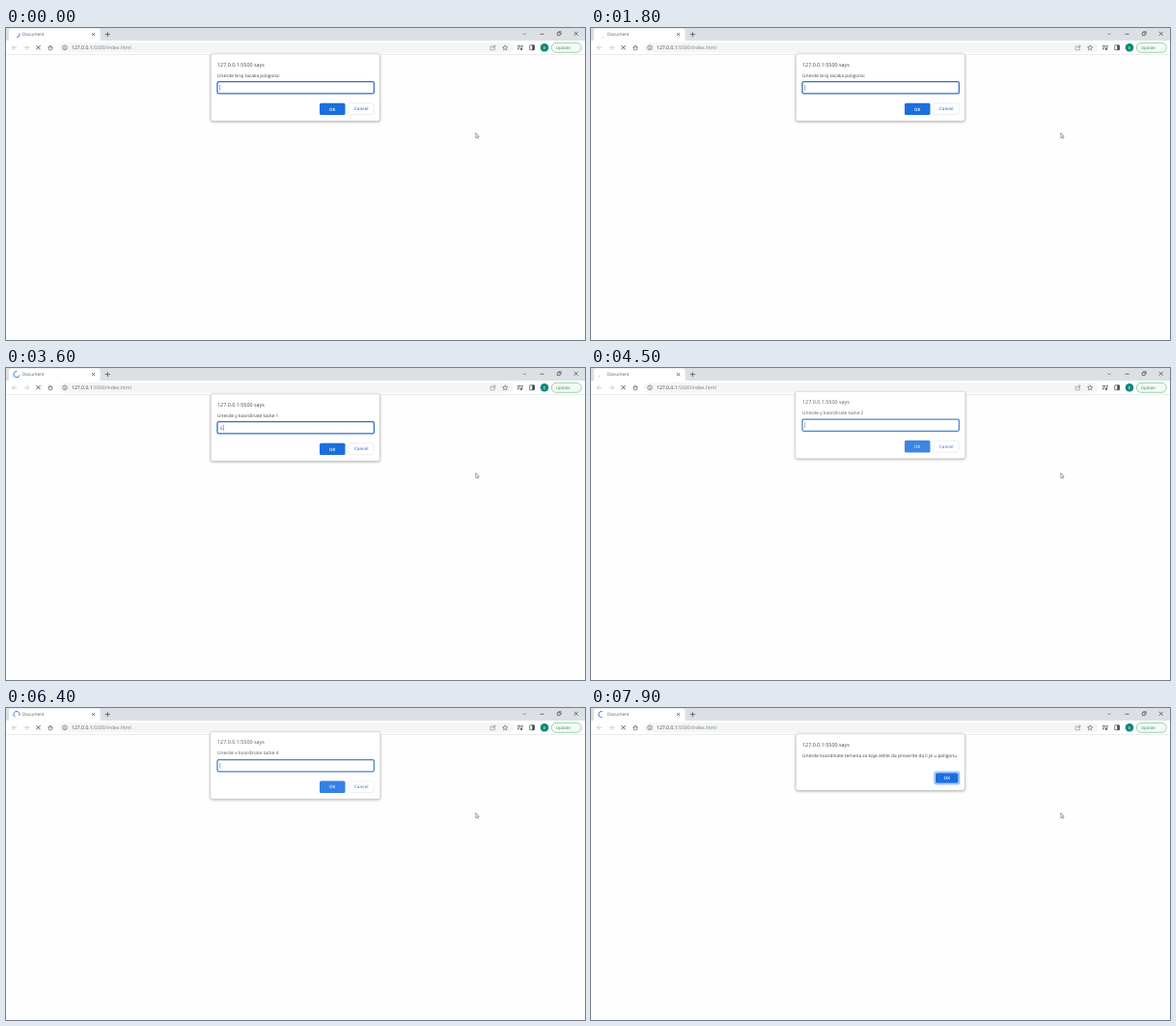
Write an HTML page with a canvas that moves like this. It is 600 px wide and 323 px high and loops after 8 s.

```html
<!DOCTYPE html>
<html lang="sr">
<head>
<meta charset="utf-8">
<title>Document</title>
<style>
html, body { margin: 0; width: 100%; height: 100%; overflow: hidden; background: #fff; }
canvas { display: block; width: 600px; height: 323px; }
</style>
</head>
<body>
<canvas id="stage" width="600" height="323"></canvas>
<script>
const ctx = document.getElementById('stage').getContext('2d');
const LOOP = 8000, STEP = 100;
const FIRST = 2525, GAP = 630;            // first coordinate prompt, time per prompt
const FADE_IN = 190, FADE_OUT = 50;
const FONT = '"Open Sans", "Noto Sans", sans-serif';
const INK = '#3f4347', GREY = '#606468', BLUE = '#1a6fdf', GREEN = '#3d8f59';
const TURN = Math.PI * 2;

const clamp = v => Math.max(0, Math.min(1, v));

function text(str, x, y, size, color = INK, weight = 400, align = 'left') {
  ctx.font = `${weight} ${size}px ${FONT}`;
  ctx.textAlign = align;
  ctx.fillStyle = color;
  ctx.fillText(str, x, y);
  return ctx.measureText(str).width;
}

function paint(fill, stroke, width) {
  if (fill) { ctx.fillStyle = fill; ctx.fill(); }
  if (stroke) { ctx.strokeStyle = stroke; ctx.lineWidth = width; ctx.stroke(); }
}

function box(x, y, w, h, r, fill, stroke, width = 0.7) {
  ctx.beginPath();
  ctx.roundRect(x, y, w, h, r);
  paint(fill, stroke, width);
}

function disc(x, y, r, fill, stroke, width = 0.7) {
  ctx.beginPath();
  ctx.arc(x, y, r, 0, TURN);
  paint(fill, stroke, width);
}

function line(x1, y1, x2, y2, color = INK, width = 0.7) {
  ctx.beginPath();
  ctx.moveTo(x1, y1);
  ctx.lineTo(x2, y2);
  paint(null, color, width);
}

function cross(x, y, r, color = INK, width = 0.75) {
  line(x - r, y - r, x + r, y + r, color, width);
  line(x - r, y + r, x + r, y - r, color, width);
}

// Right-angled tip at (x, y), pointing along the given part of a turn
function chevron(x, y, r, dir, color = INK, width = 0.7) {
  ctx.beginPath();
  for (const [along, side] of [[-r, -r], [0, 0], [-r, r]]) {
    const a = dir * TURN;
    ctx.lineTo(x + along * Math.cos(a) - side * Math.sin(a), y + along * Math.sin(a) + side * Math.cos(a));
  }
  paint(null, color, width);
}

function arrow(x, dir, color) {
  line(x - 2.4 * dir, 20.3, x + 2.4 * dir, 20.3, color);
  chevron(x + 2.4 * dir, 20.3, 2.4, dir > 0 ? 0 : 0.5, color);
}

function star(x, y, r) {
  ctx.beginPath();
  for (let i = 0; i < 10; i++) {
    const a = (i / 10 - 0.25) * TURN, len = i % 2 ? r * 0.46 : r;
    ctx.lineTo(x + len * Math.cos(a), y + len * Math.sin(a));
  }
  ctx.closePath();
  paint(null, GREY, 0.65);
}

// Cubic bezier (.4, 0, .2, 1)
function ease(x) {
  let lo = 0, hi = 1, u = 0.5;
  for (let i = 0; i < 20; i++) {
    u = (lo + hi) / 2;
    const bx = 1.2 * u * (1 - u) ** 2 + 0.6 * u * u * (1 - u) + u ** 3;
    if (bx < x) lo = u; else hi = u;
  }
  return 3 * u * u * (1 - u) + u ** 3;
}

// Alternately shrinking and growing arc on a steady rotation
function spinner(t) {
  const arcTime = 666, maxArc = 0.75, minArc = 0.033, age = t + 258;
  const half = Math.floor(age / arcTime);
  const part = ease(age % arcTime / arcTime) * maxArc;
  const growing = half % 2 === 1;
  const sweep = growing ? Math.max(part, minArc) : Math.min(part - maxArc, -minArc);
  const start = 0.722 + (t - 3100) / 1568 + (Math.floor(half / 2) - 2) * maxArc;
  ctx.beginPath();
  ctx.arc(11, 6.6, 3.1, start * TURN, (start + sweep) * TURN, !growing);
  paint(null, '#3f7fdc', 1);
}

function tabStrip() {
  ctx.fillStyle = '#dce0e4';
  ctx.fillRect(0, 0, 600, 13);
  box(3, 0.5, 94.5, 16, 2.5, '#fff');
  text('Document', 17, 8.3, 4.6, '#54585c');
  cross(90.5, 6.6, 1.5);
  line(102.7, 6.6, 107.9, 6.6);
  line(105.3, 4, 105.3, 9.2);
  chevron(537.2, 7, 1.5, 0.25, GREY);
  line(553.3, 6.3, 557.5, 6.3);
  box(571.2, 4.6, 3, 3, 0.4, null, INK);
  chevron(575.2, 3.7, 2.1, -0.125, INK, 0.6);
  cross(590.7, 5.8, 2);
}

function addressBar() {
  box(55, 15.2, 470.5, 10.3, 5.15, '#f4f5f6');
  disc(61, 20.3, 2.3, null, GREY);
  line(61, 18.9, 61, 19.5, GREY);
  line(61, 20, 61, 21.7, GREY);
  const w = text('127.0.0.1', 68, 22.1, 5.11, INK);
  text(':5500/index.html', 68 + w, 22.1, 5.11, '#74787c');
  box(502, 19, 4.4, 3.8, 0.3, null, '#85898d', 0.6);
  line(504, 21, 506.8, 18.6, '#85898d', 0.6);
  chevron(507.2, 18.6, 1.5, 0, '#85898d', 0.6);
  star(517.2, 20.5, 2.8);
}

function toolbar() {
  ctx.fillStyle = '#fff';
  ctx.fillRect(0, 13, 600, 14);
  ctx.fillStyle = '#e2e4e6';
  ctx.fillRect(0, 27, 600, 0.7);
  arrow(8.7, -1, '#b8bbbe');
  arrow(21.2, 1, '#b8bbbe');
  cross(33.5, 20.2, 2.1, INK, 0.85);
  chevron(46, 17.8, 2.6, -0.25, GREY);
  box(44.3, 19.7, 3.4, 3, 0.2, null, GREY);
  addressBar();

  for (let i = 0; i < 3; i++) {
    const y = 18.4 + i * 1.7;
    line(529.8, y, i < 2 ? 533.6 : 532, y);
    disc(591.3, 18.2 + i * 2.1, 0.62, GREEN);
  }
  line(534.8, 18.2, 534.8, 22);
  line(534.8, 18.4, 536, 18.4);
  disc(533.9, 22, 0.95, INK);
  box(542.7, 17.8, 4.9, 4.9, 0.5, null, INK);
  box(545.3, 17.8, 2.3, 4.9, 0, INK);

  disc(558, 20.3, 4.3, '#10897b');
  text('E', 558, 21.8, 4.2, '#fff', 400, 'center');
  box(565.3, 15.4, 31, 9.9, 4.95, '#f3faf5', '#75bd8b');
  text('Update', 569.8, 21.9, 4.4, GREEN);
}

// The prompts follow one another at an even pace: x and y of each corner, then a notice
function dialogAt(t) {
  const n = Math.floor((t - FIRST) / GAP);
  if (n < 0) {
    return { msg: 'Unesite broj tacaka poligona:', value: '4', open: -1000, key: 2250, close: FIRST };
  }
  const open = FIRST + n * GAP;
  if (n >= 8) {
    return { msg: 'Unesite koordinate temena za koje zelite da proverite da li je u poligonu',
      alert: true, open, close: Infinity };
  }
  const axis = n % 2 ? 'y' : 'x', corner = Math.floor(n / 2) + 1;
  return { msg: `Unesite ${axis} koordinate tacke ${corner}`, value: axis === 'x' ? '3' : '6',
    open, key: open + 0.7 * GAP, close: open + GAP };
}

function button(label, x, y, w, h, primary) {
  box(x, y, w, h, 1.5, primary ? BLUE : '#fff', primary ? null : '#e2e5e9');
  text(label, x + w / 2, y + h / 2 + 1.65, 4.5, primary ? '#fff' : '#3b79d4', 600, 'center');
}

function promptBody(d, t) {
  const typed = t >= d.key;
  box(219, 55.7, 162.4, 12.2, 1.5, '#fff', '#2f6fc6', 1.3);
  if (typed) text(d.value, 221.7, 63.6, 4.9, GREY);
  const since = typed ? t - d.key : t - Math.max(d.open, -400);
  if (since % 1060 < 530) box(typed ? 224.9 : 221.5, 58.8, 0.6, 6, 0, GREY);
  button('OK', 325, 77.7, 26.5, 12.3, true);
  button('Cancel', 355.2, 77.9, 26, 11.8, false);
}

function drawDialog(t) {
  const d = dialogAt(t);
  const shown = 1 - (1 - clamp((t - d.open) / FADE_IN)) ** 2;
  const gone = clamp((t - d.close + FADE_OUT) / FADE_OUT);
  const hidden = 1 - shown, grow = 1.8 * hidden;
  const h = d.alert ? 58.5 : 69.5;

  ctx.save();
  ctx.beginPath();
  ctx.rect(0, 23.5, 600, 300);
  ctx.clip();
  ctx.translate(0, -8.5 * hidden - 6 * gone);
  const alpha = (0.5 + 0.5 * shown) * (1 - gone);

  // The panel stays opaque so its shadow does not tint the inside
  ctx.shadowColor = `rgba(0,0,0,${0.42 * alpha})`;
  ctx.shadowBlur = 3;
  ctx.shadowOffsetY = 0.7;
  box(212.3 - grow, 26.8, 175 + 2 * grow, h, 2, '#fff');
  ctx.shadowColor = 'transparent';
  ctx.globalAlpha = alpha;
  box(212.3 - grow, 26.8, 175 + 2 * grow, h, 2, null, '#c8cacc', 0.6);

  text('127.0.0.1:5500 says', 219, 39.5, 5.4);
  text(d.msg, 219, 50.6, 4.82);
  if (d.alert) {
    box(355.9, 66.2, 25.8, 12.6, 2, null, '#8fb8ef', 1.2);
    button('OK', 357, 67.2, 23.6, 10.6, true);
  } else {
    promptBody(d, t);
  }
  ctx.restore();
}

function pointer(x, y) {
  line(x + 1.2, y + 3, x + 2.5, y + 5.8, GREY, 0.9);
  ctx.beginPath();
  ctx.moveTo(x, y);
  ctx.lineTo(x, y + 5);
  ctx.lineTo(x + 3.4, y + 3.6);
  ctx.closePath();
  paint('#fff', GREY, 0.6);
}

function draw(t) {
  ctx.fillStyle = '#fefefe';
  ctx.fillRect(0, 0, 600, 323);
  tabStrip();
  spinner(t);
  toolbar();
  drawDialog(t);
  pointer(486.8, 108.7);
}

ctx.textRendering = 'geometricPrecision';
ctx.lineJoin = 'round';
function frame() {
  const t = performance.now() % LOOP;
  draw(Math.floor(t / STEP) * STEP);
  requestAnimationFrame(frame);
}
frame();
</script>
</body>
</html>
```
